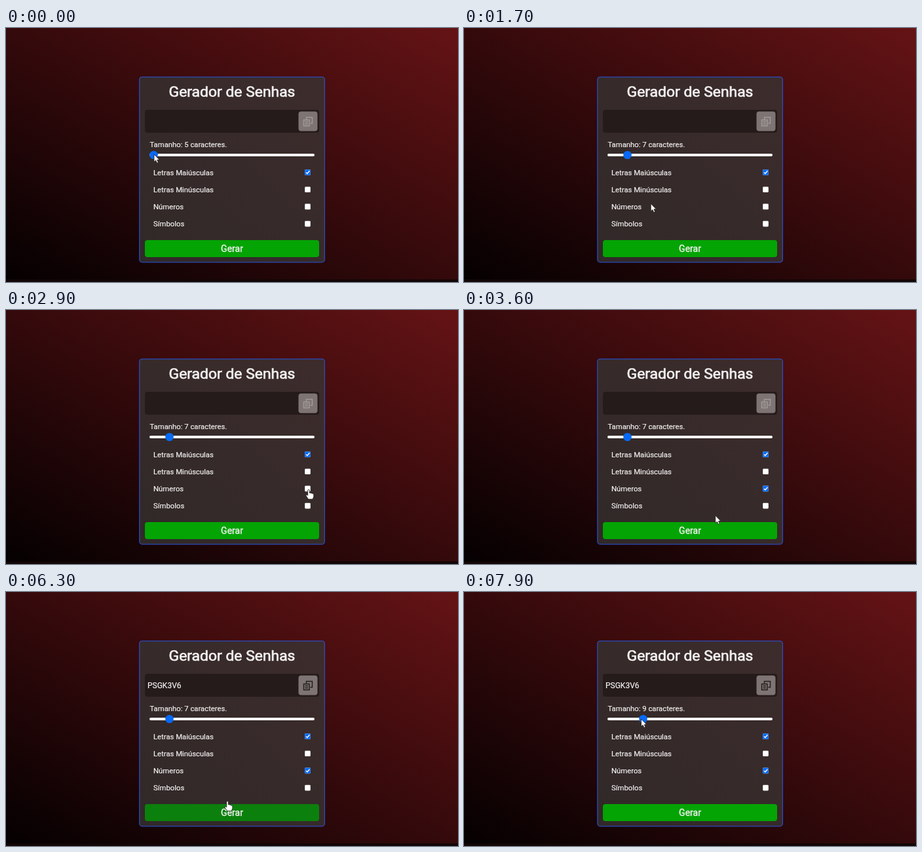
An HTML page for the animation above (8000 ms loop, 690 by 388 pixels).

```html
<!DOCTYPE html>
<html lang="pt">
<head>
<meta charset="utf-8">
<style>
html, body { margin: 0; width: 100%; height: 100%; overflow: hidden; background: #000; }
svg { display: block; width: 690px; height: 388px; }
text { font: 11.3px Roboto, sans-serif; fill: #f4f2f2; stroke: #f4f2f2; stroke-width: .2px; }
.title { font-size: 22.9px; stroke-width: .7px; text-anchor: middle; }
.action { font-size: 14px; stroke-width: .35px; text-anchor: middle; }
.pointer { fill: #fff; stroke: #221a1a; stroke-width: .8px; stroke-linejoin: round; }
</style>
</head>
<body>
<svg viewBox="0 0 690 388">
  <defs>
    <linearGradient id="bg" gradientUnits="userSpaceOnUse" x1="178" y1="491" x2="512" y2="-103">
      <stop offset="0" stop-color="#040001"/>
      <stop offset="1" stop-color="#651315"/>
    </linearGradient>
    <linearGradient id="card" x1="0" y1="1" x2="1" y2="0">
      <stop offset="0" stop-color="#302928"/>
      <stop offset="1" stop-color="#3d2c2c"/>
    </linearGradient>
  </defs>
  <rect width="690" height="388" fill="url(#bg)"/>
  <rect y="384" width="690" height="4" fill="#120606"/>
  <rect x="203.800" y="74.800" width="282.600" height="283" rx="4" fill="url(#card)" stroke="#2b4bbb" stroke-width="1.3"/>
  <text class="title" x="345" y="105">Gerador de Senhas</text>
  <rect x="212" y="125" width="266" height="35" rx="4" fill="#241b1a"/>
  <text id="pass" x="216" y="147" style="font-size: 12px"></text>
  <rect x="446.500" y="127.500" width="29" height="30" rx="4" fill="#7d7473"/>
  <path id="copy" fill="none" stroke-width="1.4" d="M458.500 139.500V136.500H467.500V145.500H464.500M454.500 140.500H463V149.500H454.500ZM456.500 143.500H461M456.500 146.500H461"/>
  <text id="size" x="219.500" y="182"></text>
  <rect x="219" y="192" width="252" height="4" rx="2" fill="#fff"/>
  <circle id="thumb" cy="194" r="6.300" fill="#0869f5"/>
  <g id="options"></g>
  <rect id="button" x="212" y="324" width="266" height="26" rx="4"/>
  <text class="action" x="345" y="342">Gerar</text>
  <path id="arrow" class="pointer" d="M0 0V11.500L2.600 9.200L4.500 13.200L6.500 12.300L4.700 8.400H8.200Z"/>
  <path id="hand" class="pointer" d="M-1.300 1Q0 -1 1.300 1V5.500Q2.600 4.700 3.600 6Q5 5.300 5.800 6.600Q7.500 6.200 7.800 8V11L6.200 15H-.5L-4 9.800Q-4.200 7.800 -2.300 8.400L-1.300 9.300Z"/>
</svg>
<script>
const LOOP = 8000, CHECK = 3100, GENERATE = 4100;
const STEP = 12, MIN_SIZE = 5, MIN_X = 225.5;
const $ = id => document.getElementById(id);
const show = (el, on) => { el.style.display = on ? "" : "none"; };

const labels = ["Letras Maiúsculas", "Letras Minúsculas", "Números", "Símbolos"];
$("options").innerHTML = labels.map((label, i) => {
  const y = 220.5 + i * 26.2;
  const box = fill => `<rect x="456.200" y="${y - 4.3}" width="8.600" height="8.600" rx="1.300" fill="${fill}"/>`;
  return `<text x="225" y="${y + 4}">${label}</text>${box("#fff")}
    <g class="tick">${box("#0869f5")}
    <path d="M458 ${y}l1.900 2l3.400-4.200" fill="none" stroke="#fff" stroke-width="1.400"/></g>`;
}).join("");
const ticks = document.querySelectorAll(".tick");

const easeIn = p => k => k ** p;
const easeOut = p => k => 1 - (1 - k) ** p;
const linear = easeIn(1);

// Each move ends at (x, y); the axes ease separately to bend the path.
const home = { x: 226, y: 193 };
const moves = [
  { from: 200, to: 800, x: 249, y: 194 },
  { from: 1000, to: 2700, x: 462, y: 274, easeX: easeIn(2), easeY: easeOut(5) },
  { from: 3200, to: 3800, x: 345, y: 334 },
  { from: 6260, to: 7100, x: 249, y: 194, easeX: easeOut(1.5), easeY: easeOut(2.2) },
  { from: 7400, to: 7900, x: 270.5, y: 194 }
];

function pointer(t) {
  let { x, y } = home;
  for (const m of moves) {
    const k = Math.min(1, Math.max(0, (t - m.from) / (m.to - m.from)));
    x += (m.x - x) * (m.easeX || linear)(k);
    y += (m.y - y) * (m.easeY || linear)(k);
  }
  return { x, y };
}

function sizeAt(t) {
  const x = pointer(t < 7400 ? Math.min(t, 1000) : t).x;
  return MIN_SIZE + Math.round((x - MIN_X) / STEP);
}

function draw(t) {
  const { x, y } = pointer(t);
  const size = sizeAt(t);
  const made = t >= GENERATE;
  const onButton = y > 318 && y < 350;
  const onBox = x > 455 && x < 466 && y > 266 && y < 279;
  const hand = onButton || onBox;

  $("size").textContent = `Tamanho: ${size} caracteres.`;
  $("thumb").setAttribute("cx", MIN_X + (size - MIN_SIZE) * STEP);
  $("pass").textContent = made ? "PSGK3V6" : "";
  $("copy").setAttribute("stroke", made ? "#221c1c" : "#a39b9a");
  $("button").setAttribute("fill", onButton ? "#0c800c" : "#04a404");
  ticks.forEach((tick, i) => show(tick, i === 0 || (i === 2 && t >= CHECK)));
  show($("arrow"), !hand);
  show($("hand"), hand);
  $(hand ? "hand" : "arrow").setAttribute("transform", `translate(${x} ${y})`);
}

const start = performance.now();
function frame() {
  draw((performance.now() - start) % LOOP);
  requestAnimationFrame(frame);
}
draw(0);
requestAnimationFrame(frame);
</script>
</body>
</html>
```
